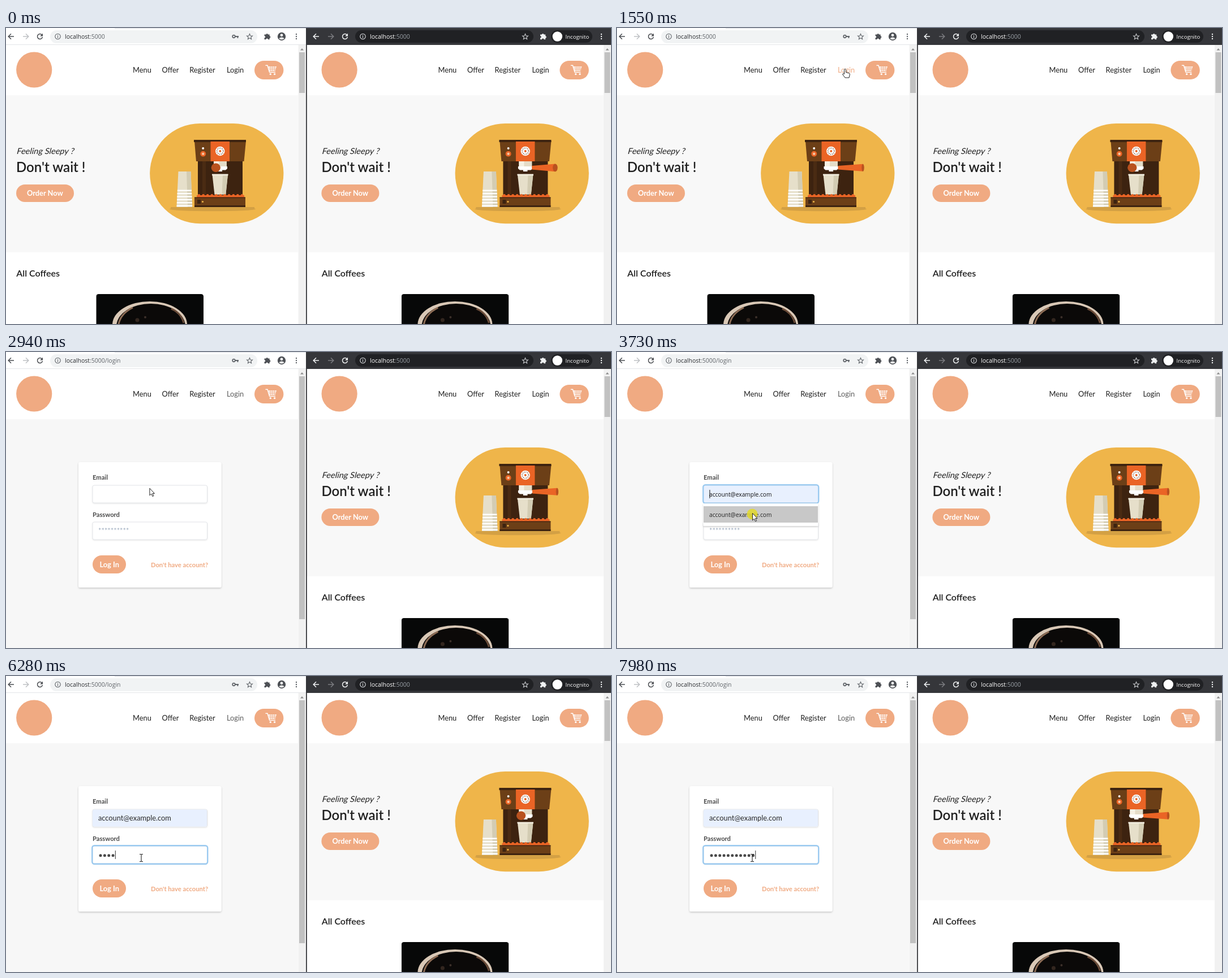
Recreate the animation shown at these times as an HTML page. Size 1069 by 524 pixels, loop 8000 ms.

```html
<!DOCTYPE html>
<html lang="en">
<head>
<meta charset="utf-8">
<title>Coffee shop login</title>
<style>
html, body { margin: 0; width: 100%; height: 100%; overflow: hidden; background: #fff; }
svg { display: block; width: 1069px; height: 524px; }
text { font-family: Lato, sans-serif; white-space: pre; }
.ui { font-family: "Open Sans", "Noto Sans", sans-serif; }
</style>
</head>
<body>
<svg id="stage" viewBox="0 0 1069 524" xmlns="http://www.w3.org/2000/svg"></svg>
<script>
const LOOP = 8000, SWING = 4740, RIGHT_X = 539.4;
const PEACH = '#f0aa82', INK = '#1f1f1f', EMAIL = 'account@example.com';

const rect = (x, y, w, h, fill, r = 0, more = '') =>
  `<rect x="${x}" y="${y}" width="${w}" height="${h}" rx="${r}" fill="${fill}" ${more}/>`;
const circle = (x, y, r, fill, more = '') =>
  `<circle cx="${x}" cy="${y}" r="${r}" fill="${fill}" ${more}/>`;
const ellipse = (x, y, rx, ry, fill, more = '') =>
  `<ellipse cx="${x}" cy="${y}" rx="${rx}" ry="${ry}" fill="${fill}" ${more}/>`;
const path = (d, fill, more = '') => `<path d="${d}" fill="${fill}" ${more}/>`;
const line = (d, color, width = 1.6, more = '') =>
  path(d, 'none', `stroke="${color}" stroke-width="${width}" ${more}`);
const label = (x, y, size, str, fill = INK, more = '') =>
  `<text x="${x}" y="${y}" font-size="${size}" fill="${fill}" ${more}>${str}</text>`;
const group = (id, body, more = '') => `<g id="${id}" ${more}>${body}</g>`;
const at = (x, y, body) => `<g transform="translate(${x} ${y})">${body}</g>`;
const repeat = (n, draw) => Array.from({ length: n }, (_, i) => draw(i)).join('');
const BOLD = 'font-weight="700"', SEMI = 'font-weight="600"';

// Browser chrome
const arrow = (x, color, flip = 1) =>
  `<g transform="translate(${x} 15) scale(${flip} 1)">${line('M5 0H-4.5M0 -4.8L-4.8 0L0 4.8', color, 1.5)}</g>`;
const reload = (x, color) => at(x, 15,
  line('M3.2 -3.1A4.5 4.5 0 1 0 4.4 1', color, 1.5) + path('M5 -5.4V-.6H.2Z', color));
const info = (x, color) =>
  circle(x, 15, 4.7, 'none', `stroke="${color}" stroke-width="1.1"`) +
  rect(x - .6, 14.3, 1.2, 3.4, color) + rect(x - .6, 12.2, 1.2, 1.3, color);
const star = (x, color) => at(x, 15.2,
  line('M0 -4.8L1.4 -1.5L5 -1.2L2.3 1.1L3.1 4.6L0 2.7L-3.1 4.6L-2.3 1.1L-5 -1.2L-1.4 -1.5Z', color, 1.1));
const puzzle = (x, color) => at(x, 15,
  path('M-5 -3.4H-2A1.7 1.7 0 1 1 1.4 -3.4H4.2V-.7A1.7 1.7 0 1 1 4.2 2.7V5.3H1.4A1.7 1.7 0 0 0 -2 5.3H-5V2.5A1.7 1.7 0 0 0 -5 -.9Z', color));
const menuDots = (x, color) => [11, 15, 19].map(y => circle(x, y, 1.2, color)).join('');
const address = (x, host, rest, tail) =>
  `<text class="ui" x="${x}" y="19" font-size="10.5" fill="${host}">localhost<tspan fill="${rest}">:5000${tail}</tspan></text>`;

const GREY = '#5f6368';
const lightBar = rect(0, 0, 530, 30, '#fff') + rect(192, 0, 338, 1, '#dee1e6') + rect(0, 29, 530, 1, '#e3e5e8') +
  arrow(9, '#4a4d51') + arrow(35, '#bfc1c4', -1) +
  group('reload', reload(60, '#4a4d51')) + group('stop', line('M56 11L64 19M64 11L56 19', '#4a4d51', 1.5)) +
  rect(78, 4, 366, 23, '#f1f3f4', 11.5) + info(91.5, GREY) +
  group('urlHome', address(104, '#2b2d30', GREY, '')) + group('urlLogin', address(104, '#2b2d30', GREY, '/login')) +
  group('key', circle(402.5, 15, 2.3, 'none', `stroke="${GREY}" stroke-width="1.7"`) +
    line('M405 15H411M409.4 15V18', GREY, 1.8)) +
  star(430.5, GREY) + puzzle(461.5, '#4d5055') +
  circle(487, 15, 7.2, '#4d5055') + circle(487, 12.7, 2.4, '#fff') + path('M482.3 18.6Q487 14.2 491.7 18.6Q487 22.4 482.3 18.6', '#fff') +
  menuDots(513, GREY);
const darkBar = rect(530, 0, 539, 30, '#35363a') +
  arrow(548, '#f1f3f4') + arrow(574, '#7b7c80', -1) + reload(599, '#f1f3f4') +
  rect(617, 4, 315, 22, '#202124', 11) + info(630.5, '#dfe1e5') + address(643, '#fff', '#9aa0a6', '') +
  star(917.5, '#c8cacd') + puzzle(949, '#f1f3f4') +
  rect(963, 4, 73, 22, '#202124', 11) + circle(974.3, 15, 8.7, '#fff') +
  label(988.5, 18.5, 9.6, 'Incognito', '#fff', 'class="ui"') + menuDots(1052, '#f1f3f4');

// Shared page parts, laid out for the left window
const cart = line('M458.5 66.3H462L465.6 78.3H476', '#fff', 1.5) + path('M463.3 68.3H478L475.6 76H465.6Z', '#fff') +
  line('M464 70.8H478M465 73.4H477M468 68V76M471.3 68V76M474.6 68V76', PEACH, .9) +
  circle(467.3, 81.6, 1.7, '#fff') + circle(474.6, 81.6, 1.7, '#fff');
const nav = id => rect(0, 30, 516.5, 89, '#fff') + circle(49.7, 74, 31.6, PEACH) +
  label(224.1, 79, 12.8, 'Menu') + label(275.6, 79, 12.8, 'Offer') + label(324.2, 79, 12.8, 'Register') +
  label(390, 79, 12.8, 'Login', INK, `id="${id}"`) + rect(439, 58, 51.4, 33, PEACH, 16.5) + cart;
const scrollbar = (x, id) => rect(x, 30, 13, 494, '#f1f1f1') + path(`M${x + 3.5} 39.5H${x + 9.5}L${x + 6.5} 36Z`, '#8b8b8b') +
  rect(x + 1.5, 43, 10, 72, '#c1c1c1', 0, `id="${id}"`);

const cupStack = path('M304.5 254H326.5L329 317H301.5Z', '#e6dfca') + path('M319 254H326.5L329 317H321Z', '#d3ccb3') +
  repeat(6, i => rect(302.8 - i * .25, 286.5 + i * 5.4, 25.2 + i * .5, 2.4, '#fff'));
const machine = id => rect(254.2, 169, 236.2, 177.3, '#efb54a', 88.6) +
  ellipse(365, 320.5, 76, 3.8, '#d3a044') + rect(291, 317, 148, 4, '#d3a044') + cupStack +
  rect(339, 234, 79, 66, '#3d2310') + rect(347, 236, 6, 59, '#4a2b13') +
  path('M333 200H424L420.5 236H336Z', '#6c3f17') + rect(332, 198, 92, 4, '#3d2310') +
  rect(361.5, 201, 33.5, 35, '#ea6425') +
  circle(378.3, 218, 8.2, '#fff') + circle(378.3, 218, 5.6, 'none', 'stroke="#71472a" stroke-width="2" stroke-dasharray="1 1.93"') +
  circle(378.3, 218, 2, '#ea6425') +
  circle(348.2, 213, 2, '#fff') + circle(348.2, 222.8, 5, '#ea6425') + circle(348.2, 222.8, 2.2, '#f6c7a4') +
  rect(367, 236, 23, 11, '#e4dcc8') + rect(367, 236, 9, 11, '#f6f1e4') +
  path('M365.5 245H391V249L388 251.5H382V254H374.5V251.5H368.5L365.5 249Z', '#fff') +
  path('M364.5 259.5H392L388.3 295H368.5Z', '#e6dfca') + path('M383 259.5H392L388.3 295H381.5Z', '#d3ccb3') + rect(364, 258.5, 28.5, 2.6, '#f3eee0') +
  rect(337, 296, 84, 5, '#ea6425') + repeat(11, i => circle(341 + i * 7.6, 296.5, 2.4, '#ea6425')) +
  rect(333, 300, 90, 17, '#6c3f17') + rect(333, 314, 90, 3, '#3d2310') + rect(333, 299.5, 90, 1.5, '#3d2310') +
  rect(338, 304, 6, 7, '#3d2310') + circle(347.5, 307.5, 1.6, '#efb54a') +
  group(id, path('', '#ea6425') + ellipse(0, 247.3, 0, 0, '#b9521f'));

const coffeePhoto = '<g clip-path="url(#photo)">' + rect(159, 471, 190, 60, '#070808', 4) +
  ellipse(254, 525, 66, 41, '#d9c8b6') + ellipse(256, 528, 61, 40, '#0b0908') +
  line('M199 524Q203 505 224 495', '#8d6c55', 3) + line('M292 497Q309 504 314 522', '#6b4c39', 3) +
  circle(232, 517, 3.5, '#33261f') + circle(246, 512, 2, '#3d302a') + '</g>';
const home = id => rect(-8, 119, 524.5, 278, '#f8f8f8') + rect(-8, 397, 524.5, 127, '#fff') +
  `<g transform="translate(18.3 223) skewX(-14)">${label(0, 0, 14.6, 'Feeling Sleepy ?')}</g>` +
  label(18, 255.4, 24, "Don't wait !", INK, SEMI) + rect(18, 277, 102, 31, PEACH, 15.5) +
  label(37, 297, 12.8, 'Order Now', '#fff', BOLD) + machine(id) +
  label(18.3, 440, 16, 'All Coffees', INK, SEMI) + coffeePhoto;

const field = y => rect(153, y, 202.5, 31, '#fff', 3, 'stroke="#e2e4e8" filter="url(#soft)"');
const ring = (id, y) => group(id, rect(152.2, y - .8, 204, 32.6, 'none', 4, 'stroke="#9bcaf0" stroke-width="2.4"'));
const login = rect(0, 119, 516.5, 405, '#f7f7f7') + rect(128, 195, 252.5, 222, '#fff', 3, 'filter="url(#shade)"') +
  label(153, 226, 11.2, 'Email', '#4a4a4a', BOLD) + field(236) +
  group('filled', rect(153, 236.5, 202, 30, '#e8f0fe', 3)) + ring('ringEmail', 236) +
  label(163, 256.2, 10.2, EMAIL, '#111', 'class="ui" id="preview"') + label(163, 256, 12.8, EMAIL, '#2a2a2a', 'id="email"') +
  group('caretEmail', rect(163.4, 244, 1, 15, '#111')) +
  label(153, 291.5, 11.2, 'Password', '#4a4a4a', BOLD) + field(301) + ring('ringPass', 301) +
  label(163, 321, 12.8, '*'.repeat(10), '#a0aec0', 'id="hint"') +
  group('dots', repeat(11, i => circle(167 + i * 7.35, 317.7, 2.5, '#4a4a4a'))) +
  group('caretPass', rect(0, 309, 1, 15, '#333')) +
  rect(153, 360, 59, 32, PEACH, 16) + label(165.5, 381, 12.8, 'Log In', '#fff', BOLD) +
  label(256, 381, 11.2, "Don't have account?", PEACH, BOLD) +
  group('dropdown', rect(152.5, 268, 203, 40, '#fff', 1, 'filter="url(#shade)"') +
    group('option', rect(153, 273, 202, 29, '#c8c8c8')) + label(163, 291.5, 10.2, EMAIL, '#222', 'class="ui"'));

const outline = 'stroke="#222" stroke-width="1" stroke-linejoin="round"';
const pointer = group('pointer',
  group('click', circle(0, 2, 9.5, '#e3d92b', 'opacity=".85"')) +
  group('arrow', path('M.5 .5V13L3.4 10.3L5.5 14.8L7.5 13.9L5.5 9.6H9Z', '#fff', outline)) +
  group('hand', path('M-1.5 1.5Q0 -1 1.5 1.5V6.5L7.5 8Q9 9 8 12L7 16H0L-4.5 10Q-4 7.6 -1.5 9.5Z', '#fff', outline)) +
  group('beam', line('M-3 -6.5H-1L0 -5.8L1 -6.5H3M0 -6V6M-3 6.5H-1L0 5.8L1 6.5H3', '#222', 1.1)));

const stage = document.getElementById('stage');
stage.innerHTML = `<defs>
  <clipPath id="photo">${rect(159.5, 471, 189.5, 60, '#000', 4)}</clipPath>
  <filter id="soft"><feDropShadow dx="0" dy="1" stdDeviation="1" flood-opacity=".12"/></filter>
  <filter id="shade"><feDropShadow dx="0" dy="1.5" stdDeviation="1.6" flood-opacity=".2"/></filter></defs>` +
  rect(0, 0, 1069, 524, '#fff') +
  at(RIGHT_X, 0, nav('loginRight') + home('handleRight')) + scrollbar(1056, 'thumbRight') +
  nav('loginLink') + group('home', home('handleLeft')) + group('login', login) +
  rect(516, 30, 14, 494, '#fff') + scrollbar(516.5, 'thumb') +
  lightBar + rect(530, 0, 1.8, 524, '#35363a') + darkBar + pointer;

const el = {};
stage.querySelectorAll('[id]').forEach(node => { el[node.id] = node; });
const show = (name, on) => el[name].setAttribute('visibility', on ? 'inherit' : 'hidden');
const within = (t, a, b) => t >= a && t < b;
const ease = u => (1 - Math.cos(Math.PI * u)) / 2;

// Keys are [time, ...values]; values are eased between neighbours.
function track(keys, t) {
  const n = keys.findIndex(k => k[0] > t);
  if (n < 1) return (n ? keys[keys.length - 1] : keys[0]).slice(1);
  const [a, b] = [keys[n - 1], keys[n]];
  const u = ease((t - a[0]) / (b[0] - a[0]));
  return a.slice(1).map((v, i) => v + (b[i + 1] - v) * u);
}

const swingKeys = [[2640, 90], [3240, -8], [3720, 90], [3800, 90], [4250, -8], [4360, -8], [SWING, 90]];
const cursorKeys = [[60, 285, 460], [860, 352, 83], [1000, 352, 83], [1450, 403, 72], [1800, 403, 72],
  [2380, 354, 126], [2780, 320, 195], [3000, 240, 250], [3300, 240, 250], [3600, 239, 285], [3900, 239, 285], [4300, 239, 322]];
const clicks = [1700, 3000, 3700, 4380];
const strokes = [5300, 5500, 5800, 6150, 6400, 6600, 7050, 7250, 7450, 7650, 7850];

// The handle turns about the brew head, seen from the front.
function setHandle(node, time) {
  const angle = track(swingKeys, time % SWING)[0] * Math.PI / 180;
  const s = Math.sin(angle), c = Math.cos(angle);
  const root = 378.5 + 12 * s, tip = 378.5 + 56 * s, half = 6.5 + 1.2 * c;
  const [body, cap] = node.children;
  body.setAttribute('d', `M${root} ${247.3 - 3.2}L${tip} ${247.3 - half}V${247.3 + half}L${root} ${247.3 + 3.2}Z`);
  cap.setAttribute('cx', tip);
  cap.setAttribute('rx', 2.2 + 6 * c);
  cap.setAttribute('ry', half);
}

function render(t) {
  setHandle(el.handleLeft, t + 3228);
  setHandle(el.handleRight, t + 2820);

  const routed = t >= 1870, onLogin = t >= 2600, chosen = t >= 3850;
  show('stop', routed && !onLogin);
  show('reload', !routed || onLogin);
  show('urlHome', !routed);
  show('urlLogin', routed);
  show('key', !within(t, 4200, 5290));
  show('home', !onLogin);
  show('login', onLogin);
  el.thumb.setAttribute('height', onLogin ? 430 : 72);
  el.loginLink.setAttribute('fill', onLogin ? '#5c5c5c' : t >= 1400 ? PEACH : INK);

  const preview = within(t, 3480, 3850);
  show('ringEmail', onLogin && within(t, 3040, 4400));
  show('dropdown', onLogin && within(t, 3060, 3850));
  show('option', onLogin && preview);
  show('preview', onLogin && preview);
  show('filled', onLogin && t >= 3480);
  show('email', onLogin && chosen);
  show('caretEmail', onLogin && within(t, 3040, 4400) && (t - 3100) % 1000 < 700);

  const typed = strokes.filter(s => s <= t).length;
  const since = t - (typed ? strokes[typed - 1] : 4400);
  show('ringPass', t >= 4400);
  show('hint', onLogin && !typed);
  [...el.dots.children].forEach((dot, i) => dot.setAttribute('visibility', onLogin && i < typed ? 'inherit' : 'hidden'));
  show('caretPass', t >= 4400 && since % 1000 < 400);
  el.caretPass.setAttribute('transform', `translate(${163.4 + typed * 7.35} 0)`);

  const [x, y] = track(cursorKeys, t);
  const hand = within(t, 1380, 1900), beam = within(t, 2960, 3380) || t >= 4180;
  el.pointer.setAttribute('transform', `translate(${x} ${y})`);
  show('pointer', t >= 60);
  const visible = (name, on) => el[name].setAttribute('display', on ? 'inline' : 'none');
  visible('hand', hand);
  visible('beam', beam);
  visible('arrow', !hand && !beam);
  visible('click', clicks.some(c => within(t, c, c + 140)));
}

const start = performance.now();
function frame() {
  render((performance.now() - start) % LOOP);
  requestAnimationFrame(frame);
}
frame();
</script>
</body>
</html>
```
